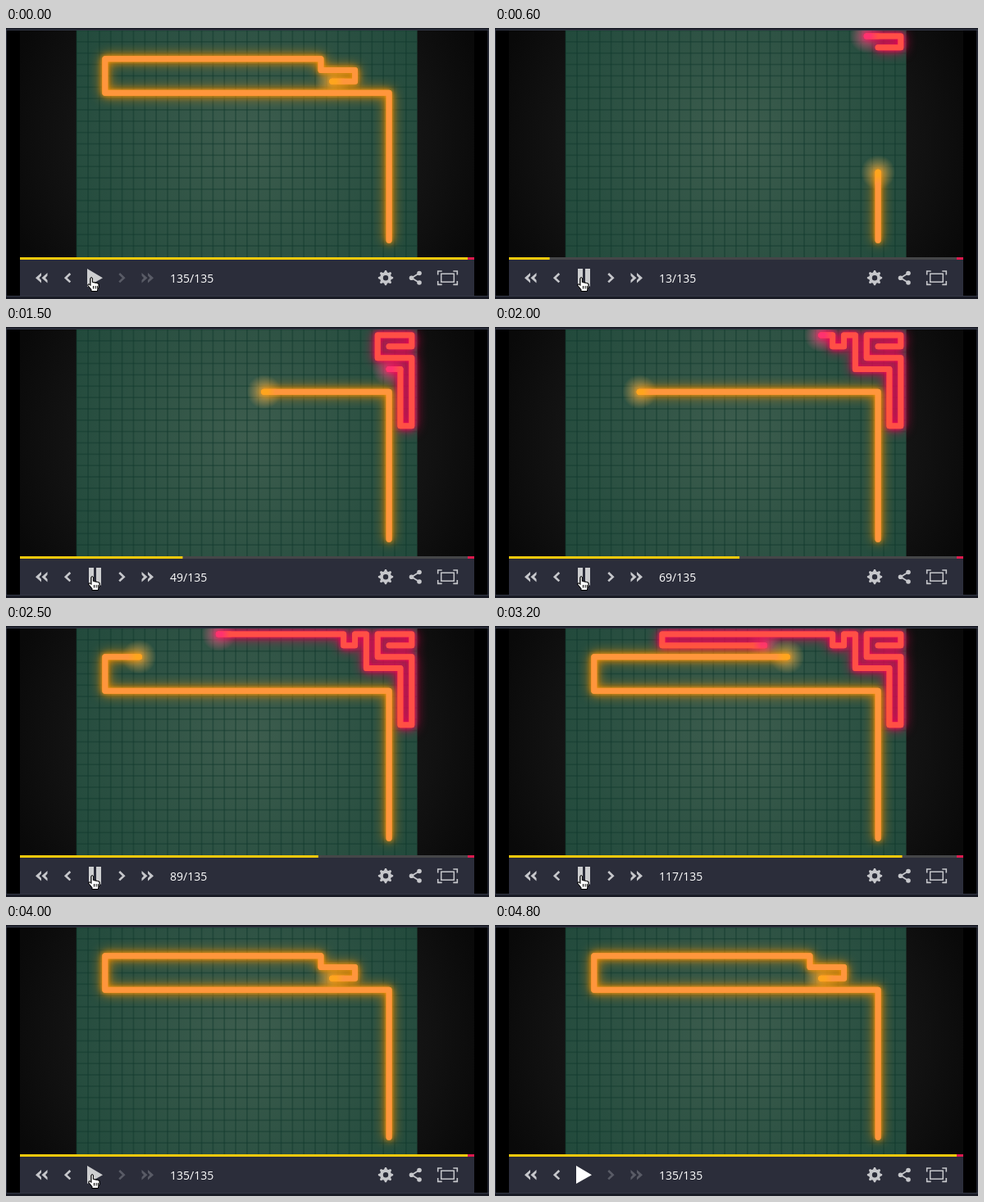
Write an HTML page with a canvas that moves like this. It is 589 px wide and 331 px high and loops after 5300 ms.

```html
<!DOCTYPE html>
<html lang="en">
<head>
<meta charset="utf-8">
<title>Light trail replay</title>
<style>
  html, body { margin: 0; width: 100%; height: 100%; overflow: hidden; background: #000; }
  canvas { display: block; width: 589px; height: 331px; }
</style>
</head>
<body>
<canvas id="stage" width="589" height="331"></canvas>
<script>
const ctx = document.getElementById('stage').getContext('2d');
const LOOP = 5300, STEP = 100, START = 300, CRASH = 3800, LEAVE = 4500;
const TURNS = 135, CELL = 13.85, LEFT = 86.2, TOP = 3;
const ICON = '#c6c7cb', DIM = '#595b66';

// Expand "R2U1..." into a list of cell centres.
function route(col, row, moves) {
  const dirs = { R: [1, 0], L: [-1, 0], U: [0, -1], D: [0, 1] };
  const at = () => [LEFT + (col + .5) * CELL, TOP + (row + .5) * CELL];
  const cells = [at()];
  for (const [, dir, count] of moves.matchAll(/([RLUD])(\d+)/g)) {
    for (let i = 0; i < +count; i++) {
      col += dirs[dir][0];
      row += dirs[dir][1];
      cells.push(at());
    }
  }
  return cells;
}

const orange = {
  cells: route(27, 18, 'U13L25U3R19D1R3D1L2'),
  line: '#ff963c', head: '#ffa51e', glow: '#ff9500', halo: '255,190,90'
};
const red = {
  cells: route(27, 1, 'R2U1L3D2R3D6L1U5L3U3L1D1L1U1L15D1R14D1R2'),
  line: '#ff4f46', head: '#ff3270', glow: '#ff0058', halo: '255,110,150'
};

function rect(x, y, w, h, color) {
  ctx.fillStyle = color;
  ctx.fillRect(x, y, w, h);
}

function poly(points, color) {
  ctx.beginPath();
  for (let i = 0; i < points.length; i += 2) ctx.lineTo(points[i], points[i + 1]);
  ctx.closePath();
  ctx.fillStyle = color;
  ctx.fill();
}

function strokeLine(points, color, width) {
  ctx.beginPath();
  for (let i = 0; i < points.length; i += 2) ctx.lineTo(points[i], points[i + 1]);
  ctx.strokeStyle = color;
  ctx.lineWidth = width;
  ctx.stroke();
}

function radial(x, y, r, inner, outer) {
  const g = ctx.createRadialGradient(x, y, 0, x, y, r);
  g.addColorStop(0, inner);
  g.addColorStop(1, outer);
  return g;
}

function drawBoard() {
  rect(0, 0, 589, 331, '#000');
  rect(17, 3, 554, 278, radial(294, 141, 300, '#2c2c2c', '#090909'));
  rect(86, 3, 415.5, 277, radial(294, 135, 245, '#3d5d4e', '#224a3c'));
  ctx.fillStyle = 'rgba(18,58,46,.5)';
  for (let i = 0; i < 30; i++) ctx.fillRect(LEFT + i * CELL - .8, 3, 1.6, 277);
  for (let j = 0; j < 20; j++) ctx.fillRect(86, TOP + j * CELL - .8, 415.5, 1.6);
}

function drawTrail(p, moves, alpha) {
  const cells = p.cells.slice(0, Math.min(moves, p.cells.length - 1) + 1);
  const [hx, hy] = cells[cells.length - 1];
  ctx.save();
  ctx.beginPath();
  ctx.rect(17, 3, 554, 277);
  ctx.clip();
  ctx.globalAlpha = alpha;
  ctx.lineCap = ctx.lineJoin = 'round';
  rect(hx - 22, hy - 22, 44, 44, radial(hx, hy, 21, `rgba(${p.halo},.65)`, `rgba(${p.halo},0)`));

  const points = cells.flat();
  if (cells.length > 1) {
    ctx.shadowColor = p.glow;
    ctx.shadowBlur = 15;
    strokeLine(points, p.line, 7);
    ctx.shadowBlur = 7;
    strokeLine(points, p.line, 7);
    ctx.shadowBlur = 0;
    const [tx, ty] = cells[cells.length - 2];
    const g = ctx.createLinearGradient(tx, ty, hx, hy);
    g.addColorStop(0, p.line);
    g.addColorStop(.7, p.head);
    strokeLine([tx, ty, hx, hy], g, 7);
  }
  ctx.beginPath();
  ctx.arc(hx, hy, 3.5, 0, 7);
  ctx.fillStyle = p.head;
  ctx.fill();
  ctx.restore();
}

function chevron(x, dir, color) {
  ctx.lineCap = 'butt';
  ctx.lineJoin = 'miter';
  strokeLine([x - 3 * dir, 300, x + 2.5 * dir, 305.2, x - 3 * dir, 310.4], color, 2.6);
}

function doubleArrow(x, dir, color) {
  for (const dx of [-4, 3.5]) {
    const c = x + dx;
    poly([c - 3 * dir, 299, c + 4 * dir, 305.2, c - 3 * dir, 311.4, c - 3 * dir, 308, c - .5 * dir, 305.2, c - 3 * dir, 302.4], color);
  }
}

function drawGear(x, y) {
  ctx.beginPath();
  for (let i = 0; i < 32; i++) {
    const r = i % 4 < 2 ? 9.2 : 6.9;
    const a = (i - .5) * Math.PI / 16;
    ctx.lineTo(x + r * Math.cos(a), y + r * Math.sin(a));
  }
  ctx.closePath();
  ctx.moveTo(x + 3.2, y);
  ctx.arc(x, y, 3.2, 0, 2 * Math.PI, true);
  ctx.fillStyle = ICON;
  ctx.fill('evenodd');
}

function drawShare() {
  strokeLine([504, 299.5, 494.5, 305.2, 504, 311], ICON, 1.8);
  for (const [x, y] of [[504, 299.5], [494.5, 305.2], [504, 311]]) {
    ctx.beginPath();
    ctx.arc(x, y, 2.8, 0, 7);
    ctx.fillStyle = ICON;
    ctx.fill();
  }
}

function drawScreen() {
  ctx.lineJoin = 'miter';
  ctx.strokeStyle = ICON;
  ctx.lineWidth = 1.5;
  ctx.strokeRect(530.7, 300.2, 15.6, 10);
  for (const sx of [-1, 1]) for (const sy of [-1, 1]) {
    const x = 538.5 + sx * 11.8, y = 305.2 + sy * 8.2;
    strokeLine([x - sx * 5, y, x, y, x, y - sy * 4.5], ICON, 1.6);
  }
}

function drawControls(turn, playing, hover) {
  rect(17, 283, 554, 44, '#2b2d3a');
  rect(17, 280, 554, 3, '#454648');
  rect(17, 280, (turn - 1) * 554 / (TURNS - 1), 3, '#f2c90c');
  rect(563, 280, 8, 3, '#dc1a4e');

  doubleArrow(44, -1, ICON);
  chevron(75.3, -1, ICON);
  const main = hover ? '#cdced0' : '#fff';
  if (playing) {
    rect(101, 294, 6, 21.5, main);
    rect(110, 294, 6, 21.5, main);
  } else {
    poly([99, 294, 118, 305.2, 99, 316], main);
  }
  const next = playing ? ICON : DIM;
  chevron(141.2, 1, next);
  doubleArrow(172.5, 1, next);

  ctx.fillStyle = '#fff';
  ctx.font = '14px "Open Sans", sans-serif';
  ctx.fillText(turn + '/' + TURNS, 200, 311);
  drawGear(463, 305.2);
  drawShare();
  drawScreen();

  rect(0, 0, 589, 2, '#1b1e28');
  rect(0, 2, 589, 1, '#343846');
  rect(0, 3, 1, 328, '#2c303d');
  rect(587, 3, 2, 328, '#20232e');
  rect(0, 327, 589, 4, '#191b25');
  rect(0, 327, 589, 1, '#343846');
}

function drawCursor(shape, x, y) {
  ctx.save();
  ctx.translate(x, y);
  ctx.lineJoin = 'round';
  ctx.lineWidth = 1;
  ctx.strokeStyle = '#000';
  ctx.fillStyle = '#fff';
  ctx.stroke(shape);
  ctx.fill(shape);
  ctx.stroke(shape);
  if (shape === hand) {
    for (const kx of [7.5, 10, 12.3]) strokeLine([kx, 11, kx, 14.5], '#000', 1);
  }
  ctx.restore();
}

const hand = new Path2D('M4 1.5Q5.2 0 6.4 1.5V6.5L9 7L11.5 7.5L14 8.5V13L12.5 15.5V17.5H5V15.5L1 10.5Q0.5 8.5 2.5 9L4 10.5Z');
const arrow = new Path2D('M0 0V15L3.5 12L6 17.5L8.2 16.5L5.8 11.2H10.5Z');
const exits = [[112, 262], [130, 150], [153, 29]];

function draw(t) {
  const playing = t >= START && t < CRASH;
  const hover = t < LEAVE;
  const step = Math.floor((t - START) / STEP);
  const turn = playing ? Math.min(1 + 4 * step, 133) : TURNS;
  const moves = (turn - 1) / 2;
  const fade = playing ? 1 : t >= CRASH ? Math.max(0, 2 - Math.floor((t - CRASH) / STEP)) / 3 : 0;

  drawBoard();
  if (fade > 0) drawTrail(red, moves, fade);
  drawTrail(orange, moves, 1);
  drawControls(turn, playing, hover);

  if (hover) drawCursor(hand, t < START ? 99 : 100, 304);
  else {
    const spot = exits[Math.floor((t - LEAVE) / STEP)];
    if (spot) drawCursor(arrow, ...spot);
  }
}

const began = performance.now();
function tick() {
  draw((performance.now() - began) % LOOP);
  requestAnimationFrame(tick);
}
tick();
</script>
</body>
</html>
```
